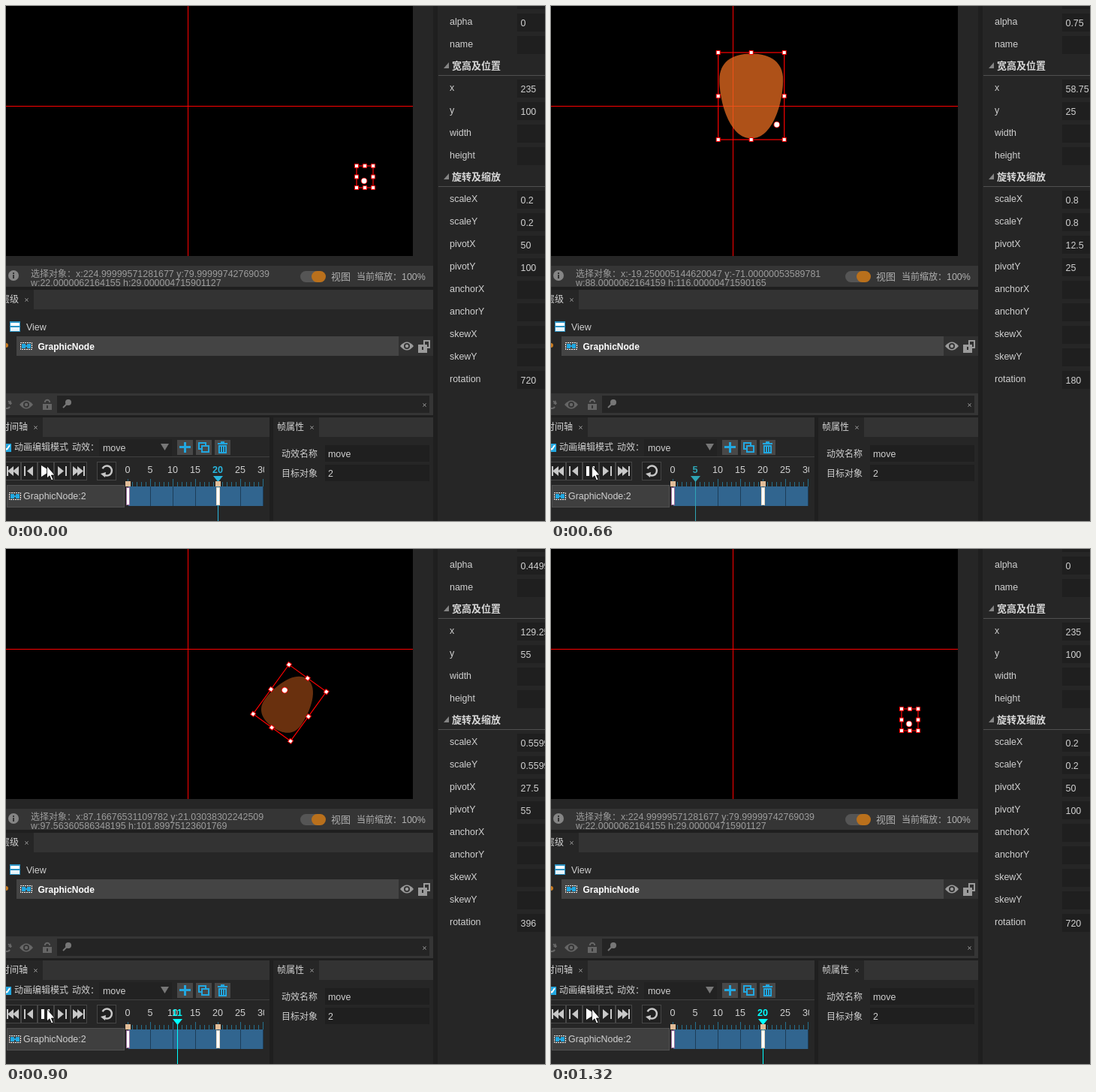
Animation of 718x686 px, one loop 3.12 s. Source, as an HTML page with a canvas:

```html
<!DOCTYPE html>
<html lang="zh">
<head>
<meta charset="utf-8">
<title>Timeline editor</title>
<style>
html, body { margin: 0; width: 100%; height: 100%; overflow: hidden; background: #262626; }
canvas { display: block; }
</style>
</head>
<body>
<canvas id="stage" width="718" height="686"></canvas>
<script>
const ctx = document.getElementById('stage').getContext('2d');
const LOOP = 3120, START = 480, STEP = 60, LAST = 20;
const ORIGIN = { x: 242, y: 133 }, NODE = { w: 110, h: 145 };
const ROUGH_PI = 3.1415926;
const LATIN = '"Liberation Sans", Arial, "Noto Sans CJK SC", "Noto Sans CJK", sans-serif';
const HAN = '"Noto Sans CJK SC", "Noto Sans CJK", sans-serif';
const PANEL = '#262626', BAR = '#353535', FIELD = '#1f1f1f', GAP = '#1f1f1f';
const TEXT = '#d0d0d0', BLUE = '#22a7e0', RED = '#ff0000';

function rect(x, y, w, h, color) {
  ctx.fillStyle = color;
  ctx.fillRect(x, y, w, h);
}

function frame(x, y, w, h, color) {
  ctx.strokeStyle = color;
  ctx.lineWidth = 1;
  ctx.strokeRect(x + 0.5, y + 0.5, w - 1, h - 1);
}

function text(str, x, y, color = TEXT, { size = 12.45, weight = '', family = LATIN, align = 'left' } = {}) {
  ctx.font = `${weight} ${size}px ${family}`;
  ctx.textAlign = align;
  ctx.fillStyle = color;
  ctx.fillText(str, x, y);
}

const han = (str, x, y, color = TEXT, size = 12, weight = '') =>
  text(str, x, y, color, { size, weight, family: HAN });

function poly(points, color) {
  ctx.beginPath();
  points.forEach(([x, y]) => ctx.lineTo(x, y));
  ctx.closePath();
  ctx.fillStyle = color;
  ctx.fill();
}

function line(x1, y1, x2, y2, color, width = 1) {
  ctx.beginPath();
  ctx.moveTo(x1, y1);
  ctx.lineTo(x2, y2);
  ctx.strokeStyle = color;
  ctx.lineWidth = width;
  ctx.stroke();
}

function disc(x, y, r, color) {
  ctx.beginPath();
  ctx.arc(x, y, r, 0, Math.PI * 2);
  ctx.fillStyle = color;
  ctx.fill();
}

function arc(x, y, r, from, to, color, width) {
  ctx.beginPath();
  ctx.arc(x, y, r, from, to);
  ctx.strokeStyle = color;
  ctx.lineWidth = width;
  ctx.stroke();
}

function pill(x, y, w, h, color) {
  ctx.beginPath();
  ctx.roundRect(x, y, w, h, h / 2);
  ctx.fillStyle = color;
  ctx.fill();
}

function cross(x, y) {
  line(x - 2, y - 2, x + 2, y + 2, '#aaaaaa');
  line(x - 2, y + 2, x + 2, y - 2, '#aaaaaa');
}

function eye(x, y, color, back) {
  ctx.beginPath();
  ctx.moveTo(x - 9, y);
  ctx.quadraticCurveTo(x, y - 11, x + 9, y);
  ctx.quadraticCurveTo(x, y + 11, x - 9, y);
  ctx.fillStyle = color;
  ctx.fill();
  disc(x, y, 4, back);
  disc(x, y, 2.2, color);
}

function closedLock(x, y, color, back) {
  arc(x, y - 3, 3.2, Math.PI, 0, color, 2);
  rect(x - 6, y - 1, 12, 8, color);
  rect(x - 1, y + 1, 2, 4, back);
}

function openLock(x, y, color, back) {
  frame(x + 7, y, 9, 11, color);
  frame(x + 8, y + 1, 7, 9, color);
  rect(x, y + 6, 12, 11, color);
  rect(x + 5, y + 9, 2, 4, back);
}

function nodeIcon(x, y) {
  ctx.setLineDash([2, 1]);
  ctx.lineDashOffset = 0.5;
  frame(x, y, 16, 10, '#ffffff');
  ctx.setLineDash([]);
  rect(x + 2, y + 2, 5, 6, BLUE);
  rect(x + 9, y + 2, 5, 6, BLUE);
  rect(x + 7, y + 4, 2, 2, BLUE);
}

function tabBar(x, y, tabWidth, right, title, titleX) {
  rect(x, y, right - x, 26, '#333333');
  rect(x, y, tabWidth, 26, PANEL);
  han(title, titleX, y + 17, '#d4d4d4');
  cross(x + tabWidth - 9.5, y + 13.5);
}

function stepAt(t) {
  const n = Math.floor((t - START) / STEP);
  if (n < 0 || n >= 14) return LAST;
  if (n === 12) return 17;
  if (n === 13) return 18;
  return Math.ceil(n * 1.5);
}

function poseAt(k) {
  const tween = (from, to) => k < LAST ? from + (to - from) * k / LAST : to;
  return {
    alpha: tween(1, 0), x: tween(0, 235), y: tween(0, 100), scale: tween(1, 0.2),
    pivotX: tween(0, 50), pivotY: tween(0, 100), rotation: tween(0, 720)
  };
}

function boundsOf(pose) {
  const angle = pose.rotation / 180 * ROUGH_PI;
  const c = Math.cos(angle) * pose.scale, s = Math.sin(angle) * pose.scale;
  const tx = pose.x - (pose.pivotX * c - pose.pivotY * s);
  const ty = pose.y - (pose.pivotX * s + pose.pivotY * c);
  const xs = [], ys = [];
  for (const u of [0, NODE.w]) for (const v of [0, NODE.h]) {
    xs.push(u * c - v * s + tx);
    ys.push(u * s + v * c + ty);
  }
  const x = Math.min(...xs), y = Math.min(...ys);
  return { x, y, w: Math.max(...xs) - x, h: Math.max(...ys) - y };
}

function drawNode(pose) {
  const s = pose.scale, w = NODE.w * s, h = NODE.h * s;
  ctx.save();
  ctx.translate(ORIGIN.x + pose.x, ORIGIN.y + pose.y);
  ctx.rotate(pose.rotation * Math.PI / 180);
  ctx.translate(-pose.pivotX * s, -pose.pivotY * s);

  ctx.save();
  ctx.scale(s, s);
  ctx.globalAlpha = pose.alpha;
  ctx.beginPath();
  ctx.moveTo(55, 2);
  ctx.bezierCurveTo(91, 2, 108, 62, 108, 100);
  ctx.bezierCurveTo(108, 128, 88, 143, 55, 143);
  ctx.bezierCurveTo(22, 143, 2, 128, 2, 100);
  ctx.bezierCurveTo(2, 62, 19, 2, 55, 2);
  ctx.fillStyle = '#e86c20';
  ctx.fill();
  ctx.restore();

  ctx.strokeStyle = RED;
  ctx.lineWidth = 1.2;
  ctx.strokeRect(0, 0, w, h);
  for (const u of [0, 0.5, 1]) for (const v of [0, 0.5, 1]) {
    if (u === 0.5 && v === 0.5) continue;
    rect(u * w - 3, v * h - 3, 6, 6, RED);
    rect(u * w - 2, v * h - 2, 4, 4, '#ffffff');
  }
  disc(pose.pivotX * s, pose.pivotY * s, 4.3, RED);
  disc(pose.pivotX * s, pose.pivotY * s, 3.4, '#ffffff');
  ctx.restore();
}

function drawViewport(pose) {
  rect(0, 0, 542, 333, '#000000');
  rect(0, 133, 542, 1, RED);
  rect(242, 0, 1, 333, RED);
  drawNode(pose);
}

function drawStatus(pose, k) {
  const gray = '#9c9c9c', b = boundsOf(pose);
  rect(0, 346, 569, 28, BAR);
  disc(10, 359, 7, '#858585');
  rect(9, 355, 2, 2, BAR);
  rect(9, 358, 2, 5, BAR);
  han('选择对象：', 33, 361, gray);
  const place = `x:${b.x} y:${b.y}`, size = `w:${b.w} h:${b.h}`;
  if (k === 0) {
    text(`${place}  ${size}`, 93, 361, gray);
  } else {
    text(place, 93, 361, gray);
    text(size, 33, 373, gray);
  }
  pill(392, 353, 30, 15, '#555555');
  pill(407, 353, 19, 15, '#b9701c');
  han('视图', 433, 365, '#b0b0b0', 13);
  han('当前缩放：', 467, 365, '#b0b0b0');
  text('100%', 527, 365, '#b0b0b0');
}

function drawLayers() {
  rect(0, 374, 569, 4, GAP);
  tabBar(0, 378, 37, 569, '层级', -7);
  rect(5, 420, 14, 14, '#2b93c4');
  rect(6, 422, 12, 4, '#ffffff');
  rect(6, 428, 12, 5, '#e8f4fa');
  text('View', 27, 432);
  rect(14, 440, 509, 26, '#444444');
  rect(523, 440, 46, 26, '#303030');
  disc(0, 452, 3, '#c97a1e');
  nodeIcon(19, 448);
  text('GraphicNode', 42.5, 458, '#ffffff', { size: 12, weight: 'bold' });
  eye(534, 453, '#9b9b9b', '#303030');
  openLock(549, 445, '#9b9b9b', '#303030');

  rect(0, 516, 569, 29, BAR);
  rect(68, 519, 496, 23, '#242424');
  arc(1, 531, 5, -1.2, 0, '#666666', 2);
  arc(1, 531, 5, 0.6, 2.6, '#666666', 2);
  poly([[3, 530], [8, 530], [6, 525]], '#666666');
  eye(27, 531, '#666666', BAR);
  closedLock(55, 531, '#666666', BAR);
  disc(83, 528, 4, '#777777');
  line(81, 530, 76, 535, '#777777', 2);
  cross(557.5, 531.5);
  rect(0, 545, 569, 3, GAP);
}

function drawToolButtons() {
  for (const x of [228, 253, 278]) rect(x, 578, 21, 20, '#484848');
  rect(237, 581, 3, 14, BLUE);
  rect(231, 586, 15, 3, BLUE);
  ctx.strokeStyle = BLUE;
  ctx.lineWidth = 2;
  ctx.strokeRect(257, 582, 9, 8);
  rect(260, 585, 11, 10, '#484848');
  ctx.strokeRect(261, 586, 9, 8);
  rect(282, 582, 13, 2, BLUE);
  rect(286, 580, 5, 2, BLUE);
  rect(283, 585, 11, 11, BLUE);
  for (const x of [285, 288, 291]) rect(x, 587, 1, 7, '#303030');
}

function drawTransport(playing) {
  const ink = '#c8c8c8';
  for (let i = 0; i < 5; i++) {
    rect(-2 + i * 22, 607, 22, 25, '#202020');
    frame(-2 + i * 22, 607, 22, 25, '#464646');
  }
  const arrow = (x, dir) => poly([[x, 613], [x, 626], [x + 8 * dir, 619.5]], ink);
  rect(1, 613, 2, 13, ink);
  arrow(10, -1);
  arrow(17, -1);
  rect(24, 613, 2, 13, ink);
  arrow(36, -1);
  if (playing) {
    rect(47, 613, 4, 13, '#ffffff');
    rect(54, 613, 4, 13, '#ffffff');
  } else {
    poly([[47, 612], [47, 627], [59, 619.5]], '#ffffff');
  }
  arrow(69, 1);
  rect(79, 613, 2, 13, ink);
  arrow(89, 1);
  arrow(95, 1);
  rect(103, 613, 2, 13, ink);

  rect(121, 607, 26, 25, '#202020');
  frame(121, 607, 26, 25, '#464646');
  arc(134.5, 619, 6.5, -2.7, 2.2, ink, 2.5);
  poly([[126, 623], [133, 621], [132, 628]], ink);
}

function playheadColor(t, k) {
  if (t < START) return '#29b6de';
  if (k === 0) return '#3fd0ee';
  if (k <= 6) return '#2fa5b5';
  if (k < 11) return '#55f0ee';
  return '#00ffff';
}

function drawRuler(t, k) {
  const headX = 162 + k * 6, color = playheadColor(t, k);
  const label = { size: 12.6, align: 'center' };
  ctx.save();
  ctx.beginPath();
  ctx.rect(155, 602, 189, 84);
  ctx.clip();
  rect(163, 640, 179, 26, '#31658f');
  for (let i = 0; i <= 30; i++) {
    const x = 162 + i * 6, major = i % 5 === 0;
    rect(x, major ? 630 : 634, 1, major ? 10 : 6, '#24718f');
    if (!major) continue;
    if (i) rect(x, 640, 1, 26, '#1d3d58');
    if (i !== k) text(i, x, 622, TEXT, label);
  }
  text(k, headX, 622, color, { ...label, weight: 'bold' });
  rect(headX, 630, 1, 56, color);
  poly([[headX - 6, 626], [headX + 7, 626], [headX + 0.5, 634]], color);
  for (const x of [162, 282]) {
    rect(x - 3, 633, 7, 7, '#e2bd98');
    rect(x - 2, 641, 5, 24, x === 162 ? '#9c6c9c' : '#e5d5bd');
    rect(x - 1, 642, 3, 22, '#ffffff');
  }
  ctx.restore();
}

function drawCursor() {
  const shape = [[54.5, 612.5], [54.5, 629], [58, 625.8], [60.6, 632], [63, 631], [60.4, 625], [65, 625]];
  poly(shape, '#ffffff');
  ctx.strokeStyle = '#000000';
  ctx.lineWidth = 0.8;
  ctx.stroke();
}

function drawTimeline(t, k) {
  tabBar(0, 548, 49, 351, '时间轴', -7);
  rect(-4, 583, 11, 11, BLUE);
  line(-2, 588, 1, 591, '#ffffff', 2);
  line(1, 591, 5, 585, '#ffffff', 2);
  han('动画编辑模式', 11, 592);
  han('动效：', 88, 592);
  rect(124, 577, 97, 23, '#222222');
  text('move', 129, 593);
  poly([[206, 583], [217, 583], [211.5, 592]], '#777777');
  drawToolButtons();
  rect(0, 600, 351, 1, '#404040');
  rect(1, 638, 157, 30, '#3f3f3f');
  frame(1, 638, 157, 30, '#505050');
  nodeIcon(4, 648);
  text('GraphicNode:2', 23, 657);
  drawTransport(t >= START && t < START + 14 * STEP);
  drawRuler(t, k);
  drawCursor();
}

function drawFrameProps() {
  tabBar(356, 548, 61, 569, '帧属性', 361);
  [['动效名称', 'move'], ['目标对象', '2']].forEach(([name, value], i) => {
    const y = 585 + i * 26;
    han(name, 367, y + 16);
    rect(425, y, 139, 22, FIELD);
    text(value, 429, y + 16);
  });
}

function propRow(name, value, y) {
  text(name, 591, y + 3);
  rect(681, y - 12, 37, 24, FIELD);
  text(value, 685.5, y + 5);
}

function propHeading(title, y) {
  poly([[590, y - 4], [590, y + 4], [583, y + 4]], '#858585');
  han(title, 594, y + 5, '#d8d8d8', 13, 'bold');
  rect(576, y + 13, 142, 1, '#505050');
}

function drawInspector(pose) {
  rect(569, 0, 6, 686, GAP);
  rect(681, 0, 37, 4, FIELD);
  propRow('alpha', pose.alpha, 22);
  propRow('name', '', 52);
  propHeading('宽高及位置', 79);
  [['x', pose.x], ['y', pose.y], ['width', ''], ['height', '']]
    .forEach(([name, value], i) => propRow(name, value, 110 + i * 30));
  propHeading('旋转及缩放', 227);
  [['scaleX', pose.scale], ['scaleY', pose.scale], ['pivotX', pose.pivotX], ['pivotY', pose.pivotY],
    ['anchorX', ''], ['anchorY', ''], ['skewX', ''], ['skewY', ''], ['rotation', pose.rotation]]
    .forEach(([name, value], i) => propRow(name, value, 258 + i * 30));
}

function draw(t) {
  const k = stepAt(t), pose = poseAt(k);
  rect(0, 0, 718, 686, PANEL);
  drawViewport(pose);
  drawStatus(pose, k);
  drawLayers();
  rect(351, 548, 5, 138, GAP);
  drawTimeline(t, k);
  drawFrameProps();
  drawInspector(pose);
}

const began = performance.now();
function tick() {
  draw((performance.now() - began) % LOOP);
  requestAnimationFrame(tick);
}
tick();
</script>
</body>
</html>
```
